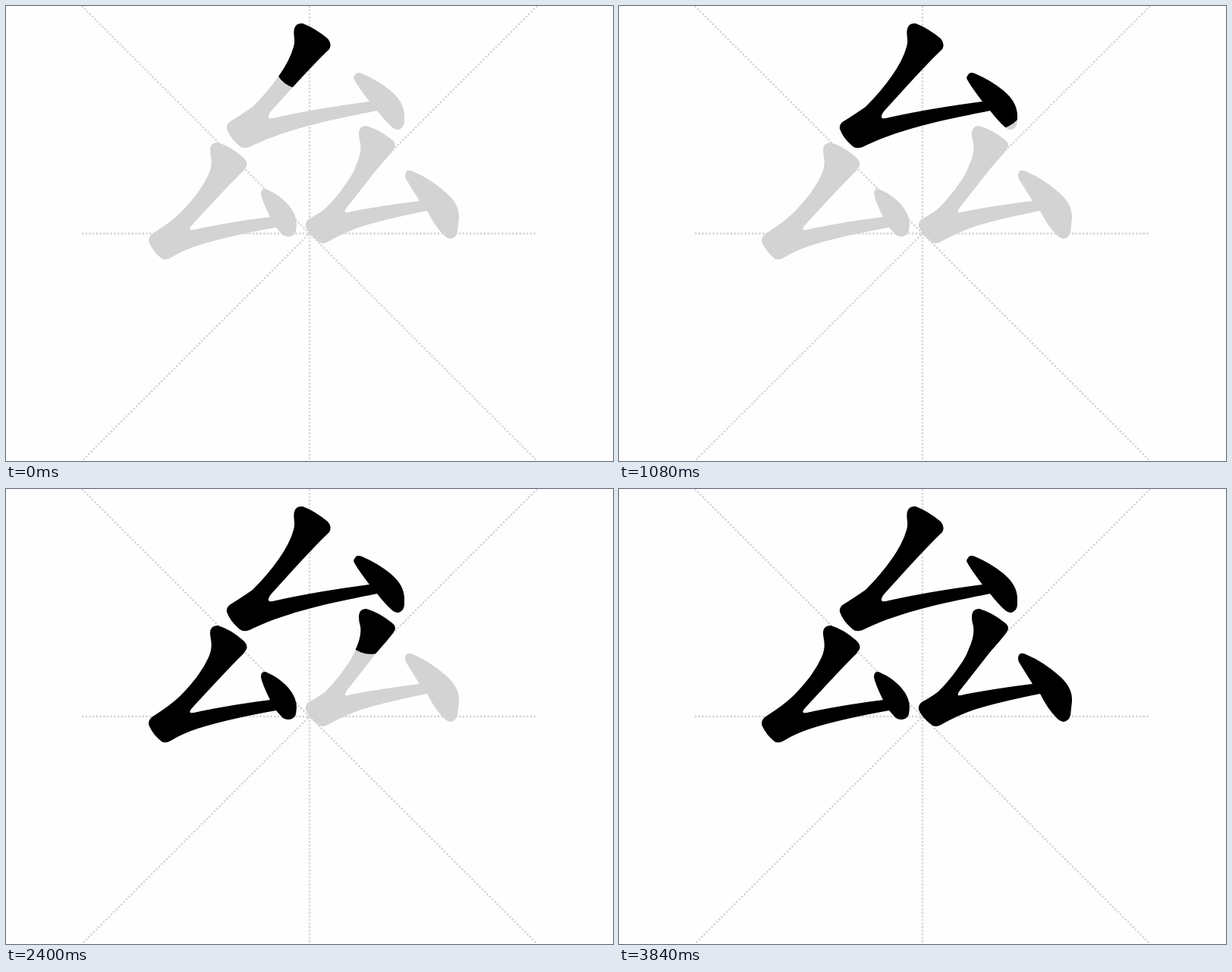
These frames come from a looping animation (800x600 px, 3.9 s). An HTML page:

```html
<!DOCTYPE html>
<html lang="en">
<head>
<meta charset="utf-8">
<title>Stroke order</title>
<style>
  html, body { margin: 0; width: 100%; height: 100%; overflow: hidden; background: #fefefe; }
  svg { display: block; width: 800px; height: 600px; }
  .grid { stroke: #d3d3d3; stroke-width: 1; stroke-dasharray: 1 1; }
  .brush { fill: none; stroke: #000; stroke-width: 75; stroke-linecap: round; stroke-linejoin: round; }
</style>
</head>
<body>
<svg id="stage" viewBox="0 0 800 600">
  <g class="grid" transform="translate(100 0) scale(2.34375)">
    <path d="M0 0L256 256M256 0L0 256M128 0V256M0 128H256"/>
  </g>
</svg>
<script>
const STEP = 60, LOOP = 3900;

// Each stroke: its outline, the brush path inside it, and its start and end in steps.
const strokes = [
  {
    outline: "M380 30Q382 22 391 23Q407 29 424 43Q430 50 426 57Q410 72 378 107L349 139Q344 146 347 148Q349 149 356 147Q410 135 479 126L490 124L496 132L489 138C440 148 375 160 325 184Q314 190 308 185Q295 174 291 162Q290 156 296 152Q306 146 325 133Q345 113 359 93Q374 72 379 54C382 44 378 38 380 30Z",
    median: "M399 54L390 72L369 100L336 138L315 166L350 157L420 143L490 131",
    start: -1.05, end: 15.7
  },
  {
    outline: "M460 91Q462 86 469 89Q490 98 506 111Q525 126 525 145L525 153Q524 161 517 163Q512 163 508 159Q500 152 489 138L479 126Q463 105 459 97Q457 94 460 91Z",
    median: "M465 95L498 125L515 154",
    start: 15.7, end: 19.8
  },
  {
    outline: "M269 190Q269 180 279 180Q296 185 313 200Q319 206 317 211Q314 217 308 222Q290 240 246 288Q241 293 243 295Q245 296 252 294Q300 284 349 278L356 279L362 284L356 292Q300 302 262 313Q235 321 217 332Q210 336 205 333Q194 324 189 313Q186 307 192 301Q198 297 204 293Q224 280 238 264Q258 242 267 222C274 206 269 198 269 190Z",
    median: "M293 197L274 238L241 277L211 313L250 303L352 286",
    start: 22, end: 36.9
  },
  {
    outline: "M337 243Q340 239 346 243Q360 249 372 262Q383 275 383 288L382 297Q380 303 373 304Q366 304 363 300L356 292L348 278Q338 258 336 248Q336 245 337 243Z",
    median: "M344 250L362 272L372 293",
    start: 36.9, end: 39.3
  },
  {
    outline: "M465 169Q465 158 475 158Q492 163 508 176Q515 181 512 187Q508 194 489 215Q475 233 449 266Q446 270 447 272Q449 273 455 271Q490 264 545 257L557 257L563 266L555 270Q500 281 468 291Q445 299 424 311Q417 315 412 311Q399 301 395 291Q394 285 399 281Q412 274 421 267Q437 251 449 233Q457 222 461 211Q469 194 467 181Q465 174 465 169Z",
    median: "M489 170L481 180L461 232L434 270L411 294L432 291L555 262",
    start: 39.25, end: 56.25
  },
  {
    outline: "M527 219Q529 215 536 218Q560 228 581 247Q598 262 597 280L595 298Q593 306 586 307Q580 306 576 301Q565 290 555 270L545 257Q533 238 527 228Q525 223 527 219Z",
    median: "M533 224L568 258L587 298",
    start: 56.25, end: 61.7
  }
];

const stage = document.getElementById("stage");

function add(parent, tag, attributes) {
  const node = document.createElementNS("http://www.w3.org/2000/svg", tag);
  for (const name in attributes) node.setAttribute(name, attributes[name]);
  return parent.appendChild(node);
}

for (const stroke of strokes) {
  add(stage, "path", { d: stroke.outline, fill: "#d3d3d3" });
}

strokes.forEach((stroke, i) => {
  const clip = add(stage, "clipPath", { id: "clip" + i });
  add(clip, "path", { d: stroke.outline });
  stroke.brush = add(stage, "path", {
    class: "brush", d: stroke.median, pathLength: 1,
    "stroke-dasharray": "1 2", "clip-path": `url(#clip${i})`
  });
  stroke.done = add(stage, "path", { d: stroke.outline });
});

function show(node, visible) {
  node.style.display = visible ? "" : "none";
}

function draw(now) {
  const step = Math.floor((now % LOOP) / STEP);
  for (const { start, end, brush, done } of strokes) {
    const progress = (step - start) / (end - start);
    show(brush, progress > 0 && progress < 1);
    show(done, progress >= 1);
    brush.setAttribute("stroke-dashoffset", 1 - Math.min(1, Math.max(0, progress)));
  }
}

const origin = performance.now();
function tick() {
  draw(performance.now() - origin);
  requestAnimationFrame(tick);
}
tick();
</script>
</body>
</html>
```
